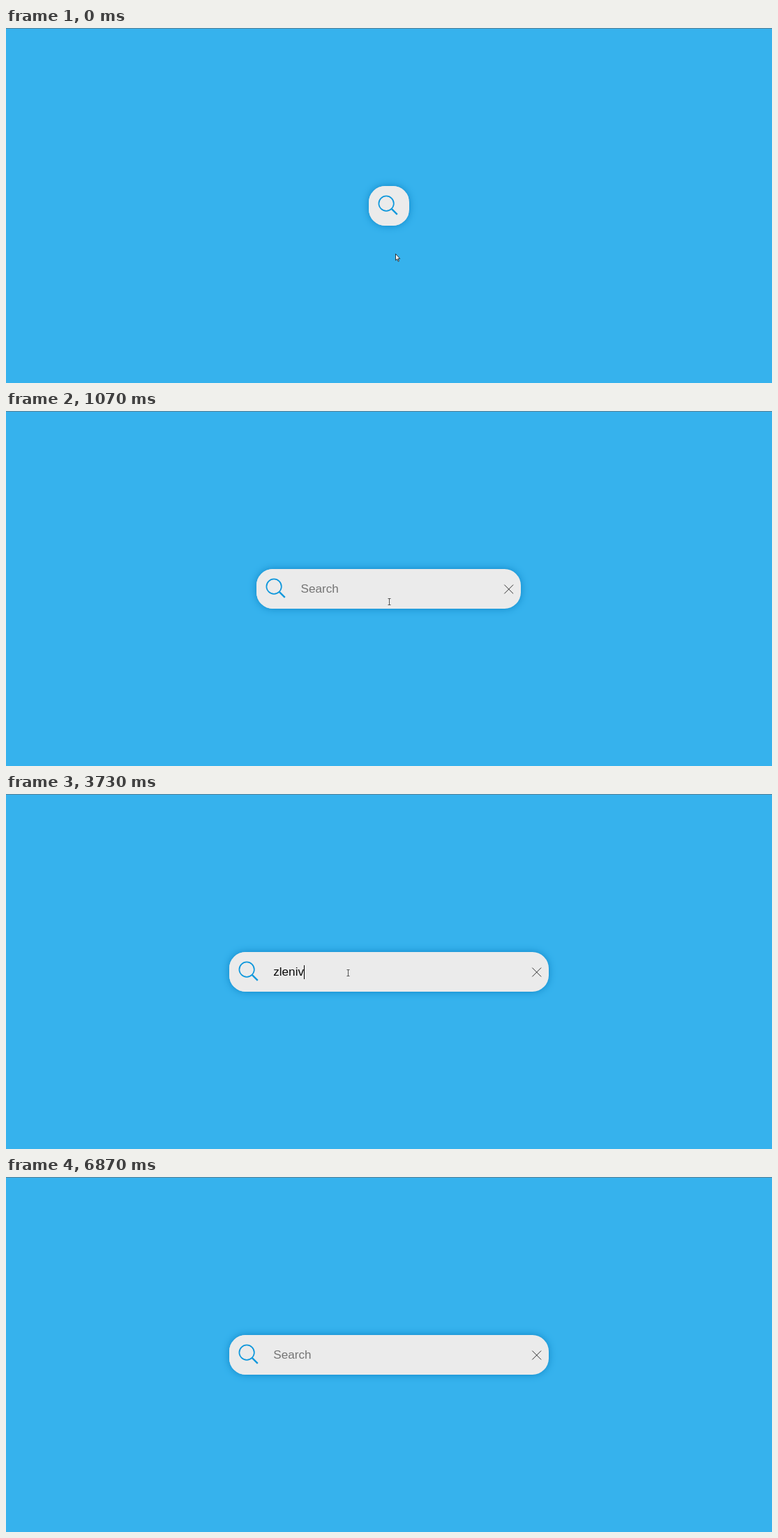
An HTML page for the animation above (8070 ms loop, 1098x510 px).

```html
<!DOCTYPE html>
<html lang="en">
<head>
<meta charset="utf-8">
<title>Expanding search bar</title>
<style>
  html, body { margin: 0; width: 100%; height: 100%; overflow: hidden; background: #36b2ed; }
  #edge { position: absolute; top: 0; left: 0; width: 100%; height: 1px; background: #557f96; }
  #bar {
    position: absolute; top: 226.9px; height: 57.2px; overflow: hidden;
    border-radius: 23.5px; background: #ebebeb; box-shadow: 0 0 11px #0f86c6;
  }
  #field {
    position: absolute; left: 63px; top: 0; line-height: 57.2px; white-space: pre;
    font-family: "Liberation Sans", Arial, sans-serif; font-size: 17.16px;
  }
  #caret { position: absolute; left: 100%; top: 19px; width: 1px; height: 20px; background: #000; }
  #icon, #clear { position: absolute; top: 0; fill: none; }
  #icon { left: 0; background: #ebebeb; stroke: #1198dc; }
  #clear { right: 0; stroke: #333; }
  #pointers { position: absolute; inset: 0; width: 100%; height: 100%; }
  #pointers path { fill: #fff; stroke: #222; stroke-width: .9; stroke-linejoin: round; }
  #pointers #beam { fill: none; stroke: #555; stroke-width: 1; }
</style>
</head>
<body>
<div id="edge"></div>
<div id="bar">
  <svg id="clear" width="35" height="57"><path d="M11.3 22.6l12.8 12.8m0-12.8l-12.8 12.8"/></svg>
  <div id="field"><span id="text"></span><i id="caret"></i></div>
  <svg id="icon" width="57" height="57">
    <circle cx="25.1" cy="25.1" r="10.7" stroke-width="1.8"/>
    <path d="M32.8 32.8l8 8" stroke-width="2.4"/>
  </svg>
</div>
<svg id="pointers">
  <path id="arrow" d="M.5.5V9.8L2.6 7.9 4.1 11.4 5.4 10.8 3.9 7.4H6.7Z"/>
  <path id="hand" d="M-1 8V.8Q0-.8 1 .8V5Q2 4 3 5.2 4 4.4 4.8 5.7 6.2 5.2 6.3 7V9Q6 11 5 13H-.5Q-3 10.5-4 8.3-3.5 6.5-1 8Z"/>
  <path id="beam" d="M-1.5-4.5h4M.5-4.5v9M-1.5 4.5h4"/>
</svg>
<script>
const LOOP = 8070, STEP = 200 / 3;
const CENTER = 549, CLOSED = 57.2, OPEN = 457.6;
const WORD = 'zlenivlok';
const KEYS = [2130, 2400, 2670, 2930, 3330, 3730, 3930, 4070, 4330];
const FOCUS = 1800, CLEARED = 6330, BLINK = 530;

// time, x, y of the pointer
const PATH = [
  [0, 558, 324], [400, 549, 274], [1333, 549, 274], [1533, 490, 257],
  [4867, 490, 257], [5533, 778, 272], [5667, 770, 256], [6000, 762, 255],
  [6600, 762, 255], [6667, 690, 290], [6733, 430, 380], [6800, 124, 490]
];

const $ = id => document.getElementById(id);
const clamp = v => Math.min(1, Math.max(0, v));
const smooth = p => p * p * (3 - 2 * p);
const bezier = (a, b, s) => 3 * a * s * (1 - s) ** 2 + 3 * b * s * s * (1 - s) + s ** 3;

// cubic-bezier(.25, .1, .25, 1)
function ease(p) {
  let low = 0, high = 1;
  for (let i = 0; i < 20; i++) {
    const mid = (low + high) / 2;
    if (bezier(.25, .25, mid) < p) low = mid; else high = mid;
  }
  return bezier(.1, 1, high);
}

function pointerAt(t) {
  const next = PATH.findIndex(key => key[0] >= t);
  if (next < 1) return next ? PATH.at(-1).slice(1) : PATH[0].slice(1);
  const [t0, x0, y0] = PATH[next - 1], [t1, x1, y1] = PATH[next];
  const p = (t - t0) / (t1 - t0), q = t < 6600 ? smooth(p) : p;
  return [Math.round(x0 + (x1 - x0) * q), Math.round(y0 + (y1 - y0) * q)];
}

function drawPointer(t, width) {
  const [x, y] = pointerAt(t);
  const right = CENTER + width / 2;
  const inside = Math.abs(x - CENTER) < width / 2 && y > 227 && y < 284;
  const shape = !inside ? 'arrow' : t < 800 || x > right - 28 ? 'hand' : 'beam';
  for (const id of ['arrow', 'hand', 'beam']) {
    const shown = id === shape && t < 6840;
    $(id).style.display = shown ? '' : 'none';
    if (shown) $(id).setAttribute('transform', `translate(${x} ${y})`);
  }
}

function drawField(t) {
  const typed = t < CLEARED ? KEYS.filter(k => t >= k).length : 0;
  $('text').textContent = typed ? WORD.slice(0, typed) : 'Search';
  $('field').style.color = typed ? '#0a0a0a' : '#757575';
  const since = t - (typed ? KEYS[typed - 1] : FOCUS);
  const lit = t >= FOCUS && t < CLEARED && Math.floor(since / BLINK) % 2 === 0;
  $('caret').style.display = lit ? '' : 'none';
  $('caret').style.left = typed ? '100%' : '0';
}

function draw() {
  const now = performance.now() % LOOP;
  const t = Math.floor((now + 5) / STEP) * STEP;
  const width = CLOSED + (OPEN - CLOSED) * ease(clamp((t - 816) / 500));
  $('bar').style.width = width + 'px';
  $('bar').style.left = CENTER - width / 2 + 'px';
  drawField(t);
  drawPointer(t, width);
  requestAnimationFrame(draw);
}
draw();
</script>
</body>
</html>
```
